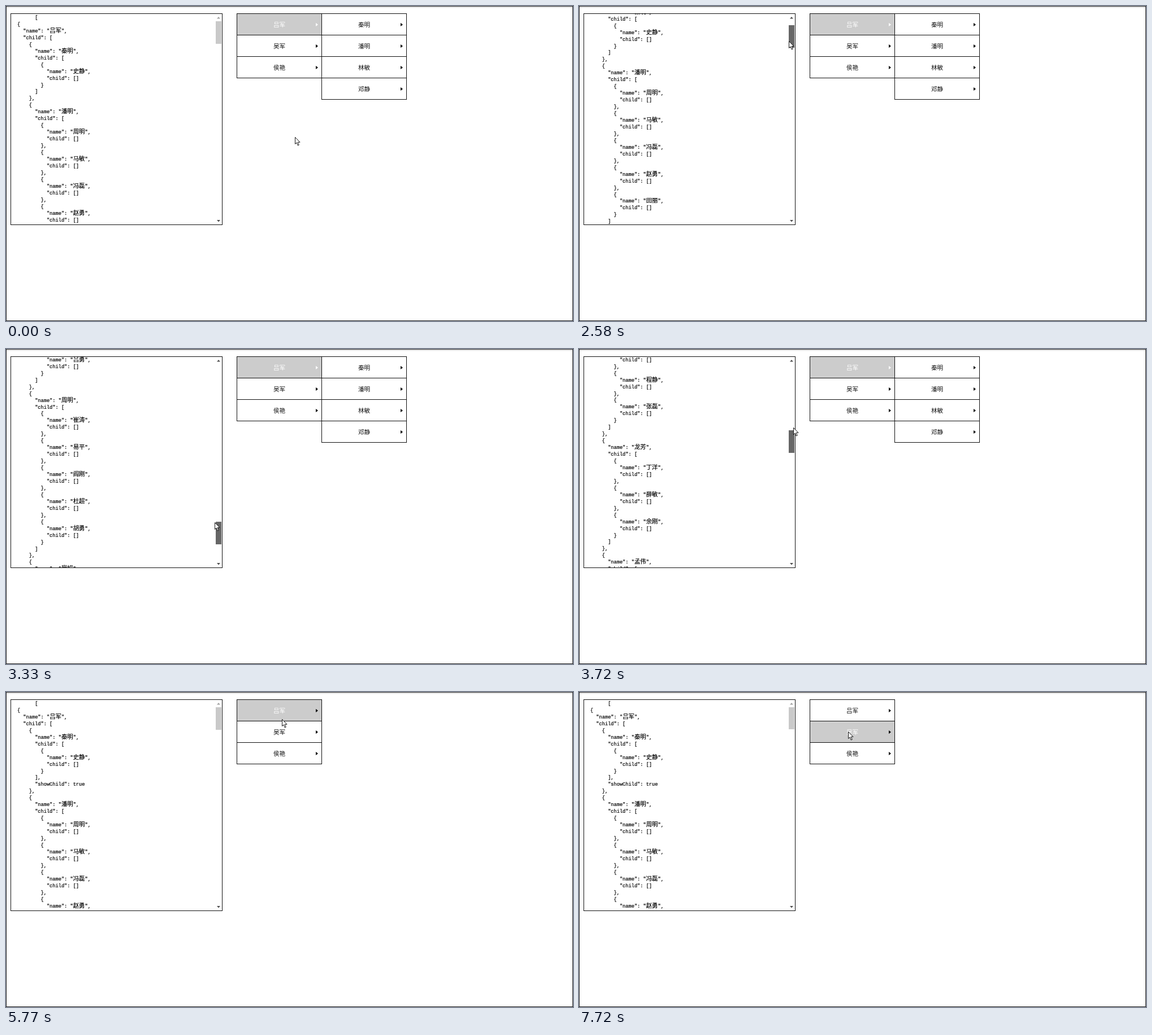
An HTML page that plays this animation: 1003x558 px, repeating every 8 s.

```html
<!DOCTYPE html>
<html>
<head>
<meta charset="utf-8">
<style>
html, body { margin: 0; width: 100%; height: 100%; overflow: hidden; background: #fff; }
body { position: relative; }
div, pre, svg { position: absolute; box-sizing: border-box; }
#page { width: 1003px; height: 558px; border: 1px solid #222; }
#rule { left: 1px; top: 2px; width: 1001px; height: 1px; background: #ccc; }
#box { left: 8px; top: 13px; width: 375px; height: 375px; border: 1px solid #111; overflow: hidden; }
pre { margin: 0; left: .6px; top: 2px; font: 8.67px/11.96px "Liberation Mono", monospace; color: #000;
  -webkit-text-stroke: .2px #000; }
pre b { font: 10.4px/0 "Noto Sans CJK SC", "Noto Sans CJK", sans-serif; }
#thumb { left: 362px; width: 10px; }
#box svg { left: 362px; width: 10px; height: 13px; }
.cell { width: 151px; height: 39.1px; border: 1px solid #111; color: #111; text-align: center;
  font: 10.6px/37px "Noto Sans CJK SC", "Noto Sans CJK", sans-serif; }
.on { background: #ccc; color: #fff; }
.more::after { content: ""; position: absolute; left: 139px; top: 16px;
  border: solid transparent; border-width: 3px 0 3px 4px; border-left-color: #000; }
.open::after { border-left-color: #fff; }
#cursor { left: 0; top: 0; width: 12px; height: 18px; overflow: visible; }
</style>
</head>
<body>
<div id="page"></div>
<div id="rule"></div>
<div id="box">
  <pre id="json"></pre>
  <div id="thumb"></div>
  <svg style="top:0"><path id="up" d="M2 8.5L5 5L8 8.5Z"/></svg>
  <svg style="top:360px"><path d="M2 5L5 8.5L8 5Z" fill="#505050"/></svg>
</div>
<div id="menu"></div>
<svg id="cursor"><path d="M.5 .5V12.5L3.2 10L5.2 15L7.2 14.2L5.2 9.3H9Z" fill="#fff" stroke="#000" stroke-width=".9"/></svg>
<script>
const LOOP = 8000, STEP = 30, LINE = 11.96, VIEW = 373, TRACK = 348, TOP = 13;
const COL = 150, ROW = 38.1, MENU_X = 408, MENU_Y = 13;
const GRAB = 2340, PULL = 2520, TURN = 3162, DROP = 4140, LEAD = 42;
const $ = id => document.getElementById(id);

const people = {
  吕军: { 秦明: '史静', 潘明: '周明 马敏 冯磊 赵勇 田丽', 林敏: '许强 何芳 罗平', 邓静: '韩杰 曹娟 谢涛' },
  吴军: { 唐霞: '姜娜 孙磊 乔霞 程静 张磊', 龙芳: '丁洋 薛敏 余刚', 孟伟: '叶超 苏丽 魏勇', 锺刚: '蒋艳 汪强 任杰' },
  侯艳: { 沈明: '康芳 贾娜 潘芳 郝敏', 郭娜: '潘静 方伟 石磊 白霞', 段丽: '雷洋 顾芳 黎明 吕勇',
    周明: '崔涛 易平 阎刚 杜超 胡勇', 廖娟: '毛杰 武静 钱强 邵敏' }
};

// Each move: start, end, target; a menu path means a click on arrival
const moves = [
  { from: 690, to: 1500, x: 238, y: 102 },
  { from: 1500, to: 1680, x: 214, y: 90 },
  { from: 1680, to: 2250, x: 371, y: 41 },
  { from: PULL, to: TURN, x: 368, y: 41 },
  { from: TURN, to: DROP, x: 386, y: 41 },
  { from: DROP, to: 4500, x: 618, y: 37, path: [0, 0] },
  { from: 4930, to: 5410, x: 507, y: 32, path: [0] },
  { from: 5590, to: 5920, x: 471, y: 62, path: [1] },
  { from: 6040, to: 6700, x: 596, y: 72, path: [1, 0] },
  { from: 6850, to: 7240, x: 598, y: 105, path: [1, 1] },
  { from: 7420, to: 7700, x: 476, y: 70, path: [1] }
];
const drags = [{ from: PULL, to: TURN, y: 2820 }, { from: TURN, to: DROP - 10, y: 0 }];

const ease = u => u * u * (3 - 2 * u);

// Value of one coordinate after easing through the list up to time t
const follow = (list, key, start, t) => list.reduce((value, m) => {
  const u = Math.min(1, Math.max(0, (t - m.from) / (m.to - m.from)));
  return value + (m[key] - value) * ease(u);
}, start);

const build = data => typeof data === 'string'
  ? data.split(' ').map(name => ({ name, child: [] }))
  : Object.entries(data).map(([name, kids]) => ({ name, child: build(kids) }));

function toggle(tree, path) {
  let list = tree, siblings, item;
  for (const i of path) { siblings = list; item = list[i]; list = item.child; }
  for (const s of siblings) if (s !== item && s.showChild) s.showChild = false;
  item.showChild = !item.showChild;
}

function menuHtml(list, col, row, mx, my) {
  let html = '', next = '';
  list.forEach((item, i) => {
    const x = MENU_X + col * COL, y = MENU_Y + (row + i) * ROW;
    const hover = mx > x && mx <= x + COL && my > y && my <= y + ROW;
    const cls = ['cell', item.child.length && 'more', (hover || item.showChild) && 'on', item.showChild && 'open'];
    html += `<div class="${cls.filter(Boolean).join(' ')}" style="left:${x}px;top:${y}px">${item.name}</div>`;
    if (item.showChild) next = menuHtml(item.child, col + 1, row + i, mx, my);
  });
  return html + next;
}

let tree, done = -1, lines, shown;

function applyClicks(t) {
  const clicks = moves.filter(m => m.path && m.to - 10 <= t);
  if (clicks.length === done) return;
  done = clicks.length;
  tree = build(people);
  toggle(tree, [0]);
  for (const { path } of clicks) toggle(tree, path);
  const text = ' '.repeat(8) + JSON.stringify(tree, null, 2);
  lines = text.split('\n').length;
  $('json').innerHTML = text.replace(/[\u4e00-\u9fff]+/g, '<b>$&</b>');
}

function draw(now) {
  const t = Math.floor(now % LOOP / STEP) * STEP;
  applyClicks(t);

  const total = lines * LINE, size = TRACK * VIEW / total;
  const ratio = (TRACK - size) / (total - VIEW);
  const offset = follow(drags, 'y', 0, t), top = TOP + offset * ratio;

  // The hand runs slightly ahead of the dragged thumb
  const mx = follow(moves, 'x', 511, t);
  const my = follow(moves, 'y', 232, t) + follow(drags, 'y', 0, t + LEAD) * ratio;

  const html = menuHtml(tree, 0, 0, mx, my);
  if (html !== shown) $('menu').innerHTML = shown = html;

  const over = mx > 370 && mx < 381 && my > top + 14 && my < top + 14 + size;
  const held = t >= GRAB && t < DROP;
  $('json').style.transform = `translateY(${-offset}px)`;
  $('thumb').style.cssText = `top:${Math.round(top)}px;height:${Math.round(size)}px;` +
    `background:${held ? '#666' : over ? '#a8a8a8' : '#c9c9c9'}`;
  $('up').setAttribute('fill', offset > 0 ? '#505050' : '#a3a3a3');
  $('cursor').style.transform = `translate(${Math.round(mx)}px,${Math.round(my)}px)`;
  requestAnimationFrame(draw);
}
requestAnimationFrame(draw);
</script>
</body>
</html>
```
